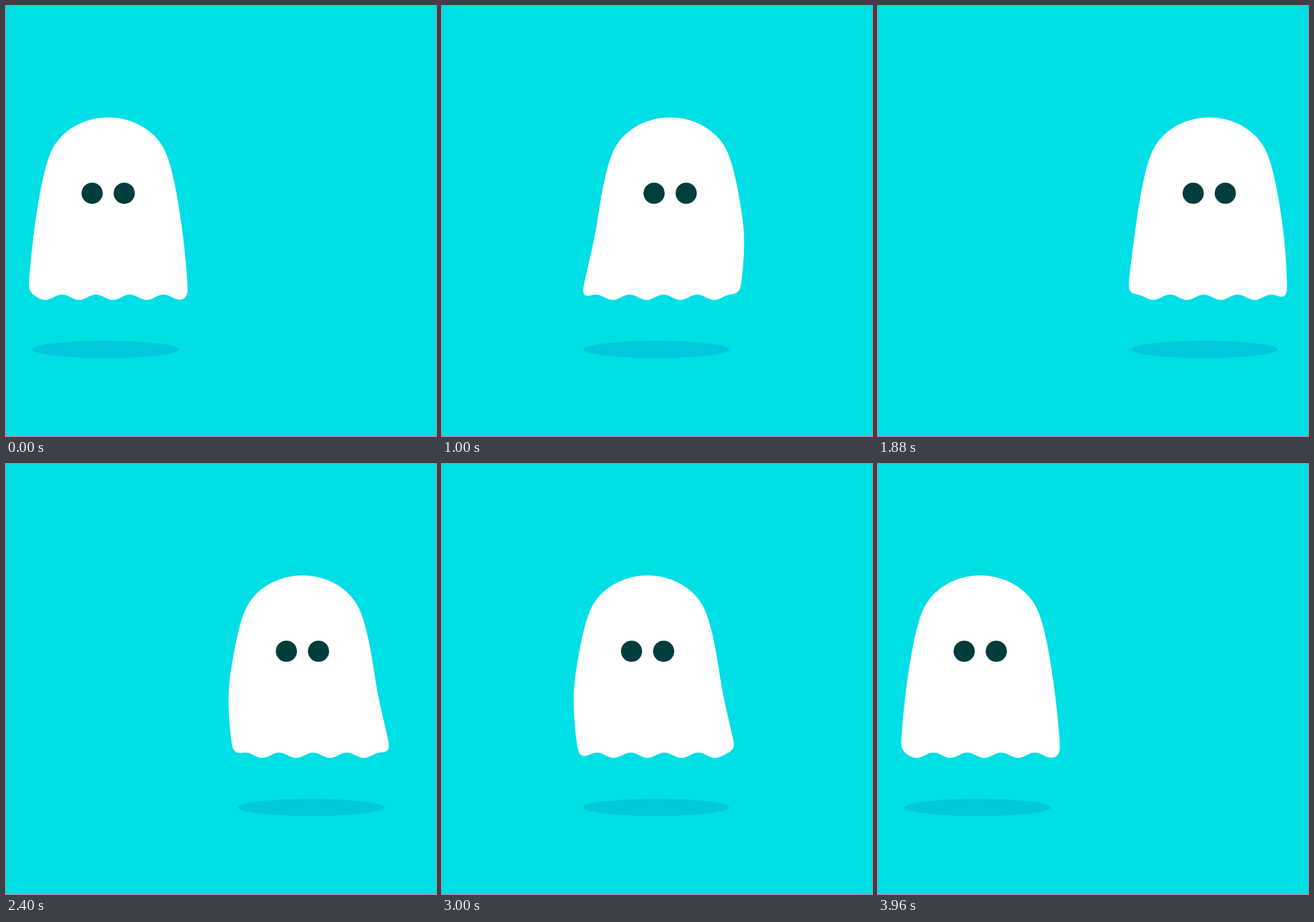
An HTML page without scripts that plays this animation: 600 px wide and 600 px high, repeating every 4000 ms.

```html
<!DOCTYPE html>
<html lang="en">
<head>
<meta charset="utf-8">
<title>Floating ghost</title>
<style>
  html, body { margin: 0; width: 100%; height: 100%; overflow: hidden; background: #00dee6; }
  svg { display: block; width: 100%; height: 100%; }
  .shadow { fill: #00c9d9; }
  .body { fill: #fff; }
  .eyes { fill: #003d3d; }
</style>
</head>
<body>
<svg viewBox="0 0 600 600">
  <defs>
    <!-- blur and threshold: rounds the corners of the skirt -->
    <filter id="round" filterUnits="userSpaceOnUse" x="-160" y="125" width="320" height="320" color-interpolation-filters="sRGB">
      <feGaussianBlur stdDeviation="7"/>
      <feComponentTransfer>
        <feFuncA type="linear" slope="17.5" intercept="-8.25"/>
      </feComponentTransfer>
    </filter>

    <!-- scalloped hem, sliding against the direction of travel -->
    <clipPath id="hem" clipPathUnits="userSpaceOnUse">
      <path d="M-146.9 406.4 q11.8 10.2 23.6 0
        t23.6 0 t23.6 0 t23.6 0 t23.6 0 t23.6 0 t23.6 0 t23.6 0 t23.6 0 t23.6 0 t23.6 0
        t23.6 0 t23.6 0 t23.6 0 t23.6 0 t23.6 0 t23.6 0 t23.6 0 t23.6 0 t23.6 0
        V130 H-146.9 Z">
        <animateTransform attributeName="transform" type="translate" dur="4s" repeatCount="indefinite"
          keyTimes="0;.01;.16;.35;.49;.5;.6;.75;.83;.99;1"
          values="0;-1;-50;-127;-187.8;-188.8;-157;-101;-68;-1;0"/>
      </path>
    </clipPath>
  </defs>

  <g>
    <!-- travel across the stage and back -->
    <animateTransform attributeName="transform" type="translate" dur="4s" repeatCount="indefinite"
      calcMode="spline" keyTimes="0;.5;1" values="0;320;0"
      keySplines=".3333 0 .6667 1;.3333 0 .6667 1"/>

    <ellipse class="shadow" cx="139" cy="479.2" rx="102" ry="12"/>

    <g transform="translate(142.6)">
      <g>
        <!-- head runs ahead of the shadow -->
        <animateTransform attributeName="transform" type="translate" dur="4s" repeatCount="indefinite"
          calcMode="spline" keyTimes="0;.1;.4;.5;.6;.9;1"
          values="0;15.5;15.5;0;-15.5;-15.5;0"
          keySplines=".42 0 .58 1;0 0 1 1;.42 0 .58 1;.42 0 .58 1;0 0 1 1;.42 0 .58 1"/>

        <g class="body" filter="url(#round)">
          <g clip-path="url(#hem)">
            <path d="M-101.5 301 V300 C-96 262 -89 222 -78.5 200 C-65 173 -34 155.2 0 155.2
              C34 155.2 65 173 78.5 200 C89 222 96 262 101.5 300 V301 Z"/>
            <!-- skirt: rest, trailing left, rest, trailing right -->
            <path d="M-101.5 300 C-105.5 328 -108.5 358 -110.5 385 L-112 425 L112 425 L110.5 385 C108.5 358 105.5 328 101.5 300 Z">
              <animate attributeName="d" dur="4s" repeatCount="indefinite"
                calcMode="spline" keyTimes="0;.1;.4;.5;.6;.9;1"
                keySplines=".42 0 .58 1;0 0 1 1;.42 0 .58 1;.42 0 .58 1;0 0 1 1;.42 0 .58 1"
                values="M-101.5 300 C-105.5 328 -108.5 358 -110.5 385 L-112 425 L112 425 L110.5 385 C108.5 358 105.5 328 101.5 300 Z;
                  M-101.5 300 C-105 324 -113 355 -119.5 385 L-128 425 L93 425 L99.5 385 C103.5 352 104.5 324 101.5 300 Z;
                  M-101.5 300 C-105 324 -113 355 -119.5 385 L-128 425 L93 425 L99.5 385 C103.5 352 104.5 324 101.5 300 Z;
                  M-101.5 300 C-105.5 328 -108.5 358 -110.5 385 L-112 425 L112 425 L110.5 385 C108.5 358 105.5 328 101.5 300 Z;
                  M-101.5 300 C-104.5 324 -103.5 352 -99.5 385 L-93 425 L128 425 L119.5 385 C113 355 105 324 101.5 300 Z;
                  M-101.5 300 C-104.5 324 -103.5 352 -99.5 385 L-93 425 L128 425 L119.5 385 C113 355 105 324 101.5 300 Z;
                  M-101.5 300 C-105.5 328 -108.5 358 -110.5 385 L-112 425 L112 425 L110.5 385 C108.5 358 105.5 328 101.5 300 Z"/>
            </path>
          </g>
        </g>

        <g class="eyes">
          <circle cx="-22.4" cy="261.3" r="14.8"/>
          <circle cx="22.4" cy="261.3" r="14.8"/>
        </g>
      </g>
    </g>
  </g>
</svg>
</body>
</html>
```
